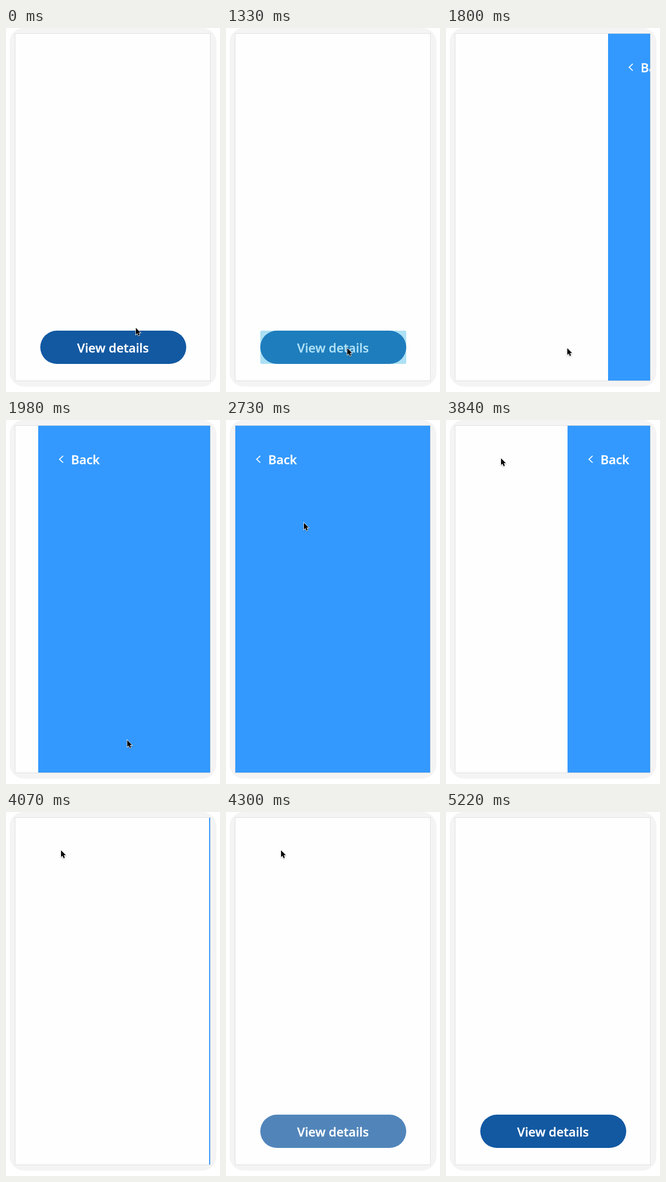
An HTML page for the animation above (5640 ms loop, 412 px wide and 700 px high).

```html
<!DOCTYPE html>
<html lang="en">
<head>
<meta charset="utf-8">
<title>View details</title>
<style>
  html, body { margin: 0; width: 100%; height: 100%; overflow: hidden; background: #fff; }
  svg { display: block; width: 412px; height: 700px; }
  text {
    font: 600 24px "Open Sans", "Noto Sans", sans-serif;
    fill: #fff; stroke: #fff; stroke-width: .35px;
  }
  .pointer { filter: drop-shadow(0 1px 1px rgba(0, 0, 0, .3)); }
</style>
</head>
<body>
<svg viewBox="0 0 412 700">
  <clipPath id="screen"><rect x="18" y="11" width="375" height="667"/></clipPath>
  <rect x="7" y="0" width="398" height="689.5" rx="27" fill="#f4f4f4"/>
  <rect x="17.5" y="10.5" width="376" height="668" fill="#fefefe" stroke="#dedede"/>

  <g id="button">
    <rect x="66" y="582" width="281" height="64" rx="32" fill="#1259a2"/>
    <text x="206" y="624" text-anchor="middle">View details</text>
  </g>
  <rect id="highlight" x="66" y="582" width="281" height="64" rx="3" fill="rgba(51,181,229,.4)"/>

  <g clip-path="url(#screen)">
    <g id="panel">
      <rect x="18" y="11" width="375" height="667" fill="#3399ff"/>
      <path d="M66 68.8L59 75.5L66 82.2" fill="none" stroke="#fff" stroke-width="1.8"/>
      <text x="81.2" y="85">Back</text>
    </g>
  </g>

  <g id="cursorX"><g id="cursorY">
    <path class="pointer" d="M1 .8V13.6L3.9 10.9L5.9 15.8L8.2 14.8L6.2 10.1H10.1Z"
      fill="#000" stroke="#fff" stroke-width="1.6" paint-order="stroke"/>
  </g></g>
</svg>
<script>
const LOOP = 5640;

// The picture refreshes at a steady rate, resynchronised at a few moments
const REFRESH = 57.5;
const syncs = [7.5, 1800, 3840];

function heldTime(t) {
  const sync = syncs.findLast(start => t >= start);
  return sync === undefined ? 0 : t - (t - sync) % REFRESH;
}

// moves: [from time, to time, new value, easing]; the value rests in between
function track(id, property, initial, moves, format = v => v) {
  const key = (time, value, easing = "linear") =>
    ({ offset: time / LOOP, [property]: format(value), easing });
  let value = initial;
  const frames = [key(0, value)];
  for (const [from, to, next, easing] of moves) {
    frames.push(key(from, value, easing), key(to, next));
    value = next;
  }
  frames.push(key(LOOP, value));
  const animation = document.getElementById(id).animate(frames, { duration: LOOP, fill: "both" });
  animation.pause();
  return animation;
}

const moveX = v => `translate(${v}px, 0px)`;
const moveY = v => `translate(0px, ${v}px)`;

const animations = [
  track("button", "opacity", 1, [[1333, 1733, 0, "ease"], [4126, 4526, 1, "ease"]]),
  track("highlight", "opacity", 0, [[1320, 1320, 1], [1430, 1560, 0]]),
  track("panel", "transform", 375,
    [[1734, 2134, 0, "ease"], [3706.5, 4106.5, 375, "ease"]], moveX),
  track("cursorX", "transform", 249, [
    [200, 560, 232.5],
    [2430, 2720, 149, "ease-in"], [2720, 3130, 105, "ease-out"],
    [4300, 4820, 271, "ease-in"], [4820, 5220, 388, "ease-out"]
  ], moveX),
  track("cursorY", "transform", 576, [
    [200, 560, 615],
    [2430, 2720, 197], [2720, 3130, 73, "ease-out"],
    [4300, 4820, 409, "ease-in"], [4820, 5220, 710]
  ], moveY)
];

const begin = performance.now();
function draw() {
  const time = heldTime((performance.now() - begin) % LOOP);
  for (const animation of animations) animation.currentTime = time;
  requestAnimationFrame(draw);
}
draw();
</script>
</body>
</html>
```
